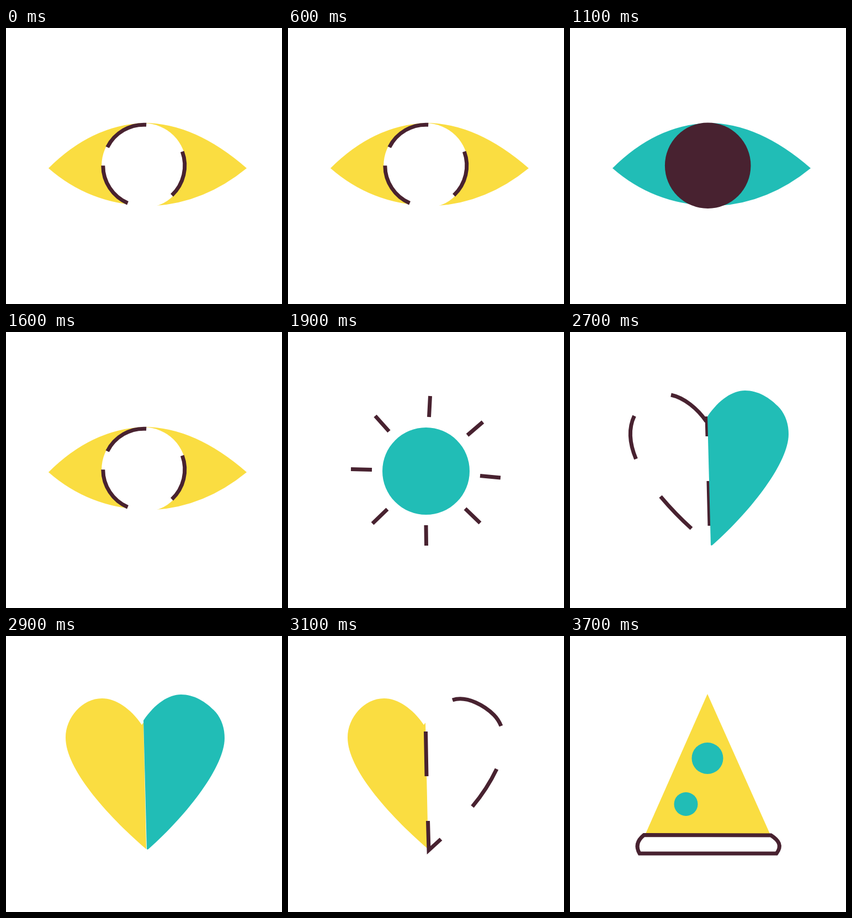
An HTML page for the animation above (3.8 s loop, 500 px wide and 500 px high).

```html
<!DOCTYPE html>
<html lang="en">
<head>
<meta charset="utf-8">
<title>Eye, sun, heart, pizza</title>
<style>
html, body { margin: 0; width: 100%; height: 100%; overflow: hidden; background: #fff; }
svg { display: block; width: 100%; height: 100%; }
.yellow { fill: #fadd41; }
.teal { fill: #21bdb6; }
.dark { fill: #482230; }
.line { fill: none; stroke: #482230; stroke-width: 7; }
</style>
</head>
<body>
<svg id="stage" viewBox="0 0 500 500"></svg>
<script>
const shape = (cls, d) => `<path class="${cls}" d="${d}"/>`;
const disc = (cls, x, y, r) => `<circle class="${cls}" cx="${x}" cy="${y}" r="${r}"/>`;

const eye = color =>
  shape(color, 'M77 254Q155 176 250 172Q342 172 436 254Q360 316 270 322H250Q150 318 77 254Z') +
  '<circle cx="249.8" cy="249.2" r="76.6" fill="#fff"/>';

// Arcs of 66.7 degrees, counterclockwise from the left
const iris = [180, 46.7, -86.6].map(a => {
  const at = deg => {
    const t = deg * Math.PI / 180;
    return `${249.8 + 74 * Math.cos(t)} ${249.2 + 74 * Math.sin(t)}`;
  };
  return `M${at(a)}A74 74 0 0 0 ${at(a - 66.7)}`;
}).join('');

const rays = 'M257.5 116L255.5 154M353 163L325 187M385 264L348 260.5M348 346L321 320' +
  'M250.5 387L250 350M153 347L180 321M114 248.5L152 249.5M158 152L183 180';
const sun = color => disc(color, 250, 252, 79) + shape('line', rays);

const left = shape('yellow', 'M249 157L246 161C226 131 198 113 174 113C138 113 108 148 108 184C108 240 180 322 254 386Z');
const right = shape('teal', 'M249 153C270 122 295 106 317 106C340 106 361 118 380 138C391 151 396 168 396 185C396 235 332 320 258 386Q256 387.5 255 386Z');
const leftDashes = shape('line', 'M183 114C207 119 231 139 247 162M248 153L249 189' +
  'M116.5 152C106 174 107 200 119.5 230M164 298Q191 330 220 356M251 270L253 351');
const rightDashes = shape('line', 'M298 116C325 107 358 128 373 143Q381 151 386 163' +
  'M378 241C367 264 350 290 334 309M277 368L255 388L253.5 335M251 254L249.5 173');

const pizza = crust =>
  shape('yellow', 'M249 105L362 358H137Z') +
  disc('teal', 249, 221.5, 28.5) + disc('teal', 210, 304.5, 21.5) +
  shape('line', crust);
const tipLeft = 'H126C119 382 121 371 134 360.5';
const tipRight = 'C378 370 385 380 374 394';

const poses = {
  a: eye('yellow') + shape('line', iris),
  b: eye('teal') + disc('dark', 249.7, 249.2, 77.8),
  c: sun('teal'),
  d: sun('yellow'),
  e: leftDashes + right,
  f: left + rightDashes,
  g: left + right,
  h: pizza(`M159 394${tipLeft}H282M363 361${tipRight}H240`),
  i: pizza(`M134 360.5L364 361${tipRight}${tipLeft}Z`),
  '-': ''
};

// One pose every 100 ms
const order = 'ab'.repeat(8) + 'a--' + 'cd'.repeat(3) + 'fgefgef' + 'hi'.repeat(3);
const stage = document.getElementById('stage');
let shown;

function draw() {
  const pose = order[Math.floor(performance.now() % 3800 / 100)];
  if (pose !== shown) stage.innerHTML = poses[shown = pose];
  requestAnimationFrame(draw);
}
draw();
</script>
</body>
</html>
```
